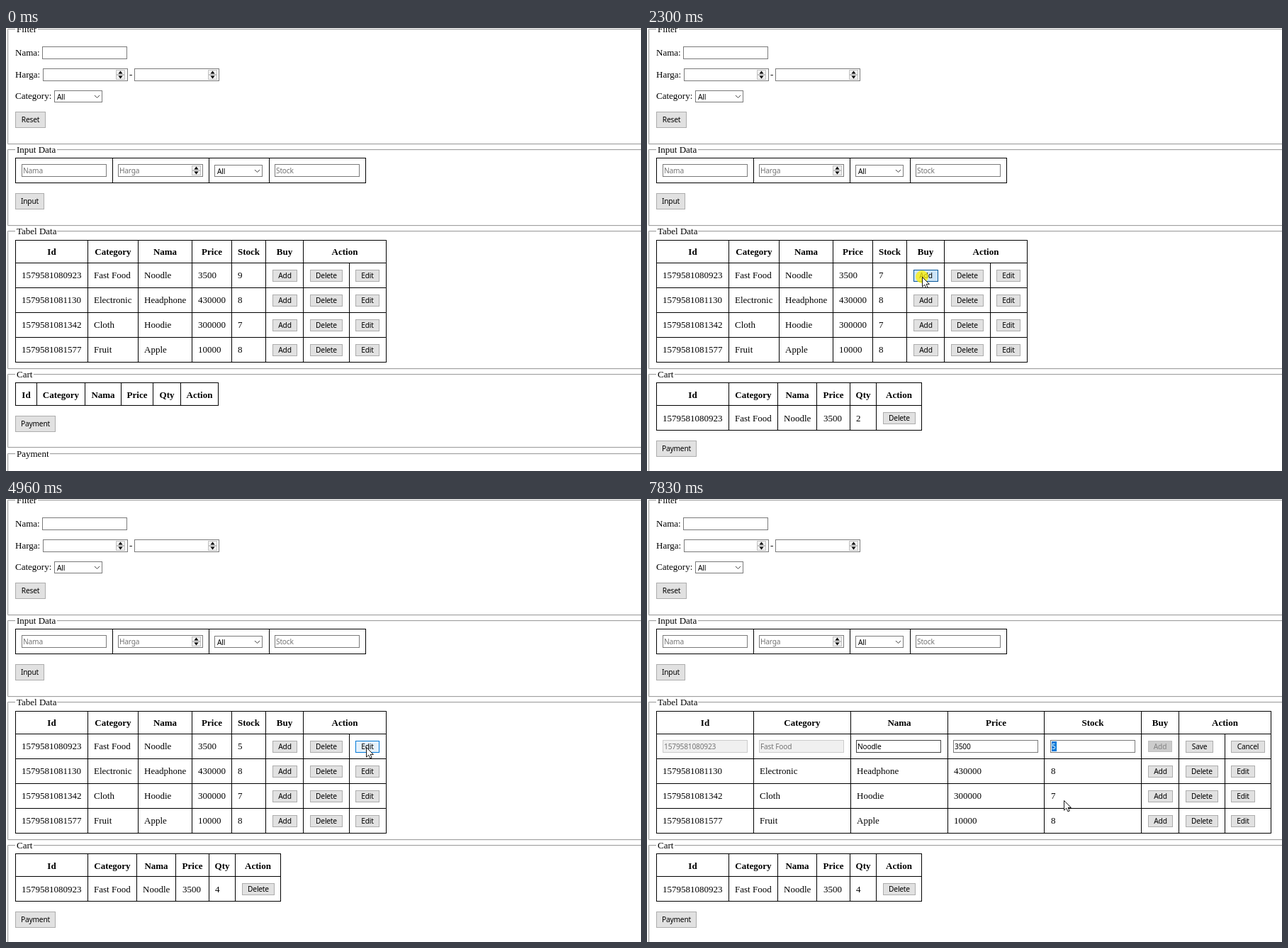
Write an HTML page that moves like this. It is 896 by 625 pixels and loops after 8000 ms.

```html
<!DOCTYPE html>
<html lang="en">
<head>
<meta charset="utf-8">
<title>Shop table</title>
<style>
html, body { margin: 0; width: 100%; height: 100%; overflow: hidden; background: #fff; }
svg { display: block; width: 896px; height: 625px; }
text { font: 13px "Liberation Serif", "Times New Roman", serif; fill: #000; white-space: pre; }
.head { font-weight: bold; }
.ui { font: 10.2px "Noto Sans", Tahoma, sans-serif; letter-spacing: -.2px; }
.mid { text-anchor: middle; }
.hint { fill: #757575; }
.field { fill: #fff; stroke: #7a7a7a; }
.field.dark { stroke: #444; }
.field.hover { stroke: #111; }
.field.focus { stroke: #0078d7; }
.field.off { fill: #f0f0f0; stroke: #ccc; }
.btn { fill: #e1e1e1; stroke: #adadad; }
.btn.hover { fill: #e5f1fb; stroke: #0078d7; }
.btn.press { fill: #cce4f7; stroke: #005499; }
.btn.off { fill: #ccc; stroke: #bfbfbf; }
.line { fill: none; stroke: #000; }
</style>
</head>
<body>
<svg id="stage" viewBox="0 0 896 625"></svg>
<script>
const stage = document.getElementById('stage');

const rect = (x, y, w, h, attrs) => `<rect x="${x}" y="${y}" width="${w}" height="${h}" ${attrs}/>`;
const frame = (x, y, w, h, cls, id = '') =>
  rect(x + .5, y + .5, w - 1, h - 1, `class="${cls}" id="${id}"`);
const text = (x, y, s, cls = '', id = '') => `<text x="${x}" y="${y}" class="${cls}" id="${id}">${s}</text>`;
const group = (id, ...parts) => `<g id="${id}">${parts.join('')}</g>`;

const field = (x, y, s = '', cls = '', textCls = '', id = '') =>
  frame(x, y, 120, 18, 'field ' + cls, id) + text(x + 2, y + 13, s, 'ui ' + textCls, id && id + 'Text');
const button = (x, y, w, s, id = '', h = 17) =>
  frame(x, y, w, h, 'btn', id) + text(x + w / 2, y + (h + 7) / 2, s, 'ui mid');
const bigButton = (y, w, s) => button(13, y, w, s, '', 23);

function spinner(x, y) {
  const half = (dy, tri) => rect(x + .5, y + dy + .5, 12, 6, 'fill="#f0f0f0" stroke="#c4c4c4"') +
    `<path d="M${x + 6.5} ${y + dy + 3.5}${tri}z"/>`;
  return half(0, 'm0-2l3 4h-6') + half(7, 'm0 2l3-4h-6');
}

const select = (x, y) => frame(x, y, 68, 17, 'field') + text(x + 4, y + 12.5, 'All', 'ui') +
  `<path d="M${x + 57} ${y + 7}l3.5 3.5 3.5-3.5" fill="none" stroke="#444"/>`;

function fieldset(top, bottom, label, w) {
  const path = (d, color) => `<path d="${d}" fill="none" stroke="${color}"/>`;
  return path(`M897 ${top + 1.5}H3.5V${bottom - .5}`, '#f0f0f0') +
    path(`M2 ${bottom + 1.5}H897`, '#f0f0f0') +
    path(`M897 ${top + .5}H2.5V${bottom + .5}H897`, '#a0a0a0') +
    rect(13, top - 1, w, 4, 'fill="#fff"') + text(15, top + 5, label);
}

// Vertical lines at xs, horizontal at ys; the split column skips the header.
function grid(xs, ys, split) {
  const l = xs[0], r = xs[xs.length - 1], b = ys[ys.length - 1];
  let d = ys.map(y => `M${l} ${y + .5}H${r + 1}`).join('');
  d += xs.map(x => `M${x + .5} ${ys[0]}V${b}`).join('');
  if (split) d += `M${split + .5} ${ys[1]}V${b}`;
  return `<path class="line" d="${d}"/>`;
}

const heads = (xs, y, names) => names.split(' ')
  .map((s, i) => text((xs[i] + xs[i + 1] + 1) / 2, y, s, 'head mid')).join('');

const goods = [
  ['1579581080923', 'Fast Food', 'Noodle', '3500', '9'],
  ['1579581081130', 'Electronic', 'Headphone', '430000', '8'],
  ['1579581081342', 'Cloth', 'Hoodie', '300000', '7'],
  ['1579581081577', 'Fruit', 'Apple', '10000', '8']
];
const rowYs = [299, 331, 366, 401, 436, 471];
const dataHeads = 'Id Category Nama Price Stock Buy Action';

function dataRow(row, i, xs, btnXs) {
  const y = 353 + i * 35, id = s => i ? '' : s;
  return row.map((s, c) => text(xs[c], y, s, '', c === 4 ? id('stock') : '')).join('') +
    button(btnXs[0], y - 12, 35, 'Add', id('add')) +
    button(btnXs[1], y - 12, 46, 'Delete', id('del')) +
    button(btnXs[2], y - 12, 34, 'Edit', id('edit'));
}

function viewTable() {
  const xs = [13, 115, 186, 262, 318, 366, 419, 536];
  return grid(xs, rowYs, 484) + heads(xs, 320, dataHeads) +
    goods.map((r, i) => dataRow(r, i, [22, 124, 195, 271, 327], [376, 429, 493])).join('');
}

function editTable() {
  const xs = [13, 150, 287, 424, 560, 697, 750, 880];
  const [id, cat, name, price] = goods[0];
  return grid(xs, rowYs, 815) + heads(xs, 320, dataHeads) +
    field(22, 340, id, 'off', 'hint') + field(158, 340, cat, 'off', 'hint') +
    field(295, 340, name, 'dark') + field(432, 340, price, '', '', 'price') +
    field(569, 340, '', '', '', 'qtyBox') +
    rect(571, 342, 7, 14, 'id="mark" fill="#0078d7"') + text(571, 353, '5', 'ui', 'five') +
    rect(577, 343, 1, 13, 'id="caret"') +
    frame(707, 341, 34, 16, 'btn off') + `<text x="724" y="353" class="ui mid" style="fill:#838383">Add</text>` +
    button(760, 341, 39, 'Save') + button(824, 341, 48, 'Cancel') +
    goods.slice(1).map((r, i) => dataRow(r, i + 1, [22, 159, 296, 433, 570], [707, 760, 824])).join('');
}

function emptyCart() {
  const xs = [13, 43, 111, 162, 207, 246, 299];
  return fieldset(488, 591, 'Cart', 26) + grid(xs, [500, 532]) +
    heads(xs, 522, 'Id Category Nama Price Qty Action') +
    bigButton(547, 57, 'Payment') + fieldset(600, 700, 'Payment', 49);
}

function fullCart() {
  const xs = [13, 115, 184, 239, 286, 323, 387], cellXs = [22, 124, 193, 249];
  return fieldset(488, 626, 'Cart', 26) + grid(xs, [500, 532, 567]) +
    heads(xs, 522, 'Id Category Nama Price Qty Action') +
    cellXs.map((x, i) => text(x, 555, goods[0][i])).join('') + text(295, 555, '1', '', 'qty') +
    button(333, 542, 46, 'Delete') + bigButton(582, 57, 'Payment');
}

stage.innerHTML = [
  fieldset(1, 163, 'Filter', 32),
  text(13, 39, 'Nama:'), field(51, 26),
  text(13, 70, 'Harga:'), field(52, 57), spinner(155, 59),
  text(174, 70, '-'), field(181, 57), spinner(285, 59),
  text(13, 100, 'Category:'), select(68, 88), bigButton(118, 43, 'Reset'),
  fieldset(171, 278, 'Input Data', 59),
  grid([13, 150, 286, 371, 507], [183, 218]),
  field(22, 192, 'Nama', '', 'hint'), field(158, 192, 'Harga', '', 'hint'), spinner(262, 194),
  select(294, 193), field(379, 192, 'Stock', '', 'hint'), bigButton(233, 41, 'Input'),
  fieldset(286, 480, 'Tabel Data', 59),
  group('view', viewTable()), group('form', editTable()),
  group('empty', emptyCart()), group('full', fullCart()),
  group('pointer',
    '<circle id="glow" r="9" fill="#fff000" fill-opacity=".75"/>',
    '<path id="arrow" d="M.5.5V14.2L3.7 11.2 6 16 8.2 15 6.1 10.4H10.4Z" fill="#fff" stroke="#000" stroke-width=".9"/>',
    '<path id="beam" d="M-2.5-4.5H-.5M.5-4.5H2.5M0-4V6M-2.5 6.5H-.5M.5 6.5H2.5" fill="none" stroke="#000"/>')
].join('');

const $ = id => document.getElementById(id);
const show = (id, on) => { $(id).style.display = on ? '' : 'none'; };

// Pointer moves: start, end, number of steps, way points.
const moves = [
  [70, 830, 11, [[767, 614], [470, 430], [376, 360]]],
  [1000, 1150, 3, [[382, 356], [388, 351]]],
  [3860, 4650, 11, [[394, 352], [475, 355], [508, 350]]],
  [5890, 6600, 10, [[516, 353], [557, 376], [596, 350]]],
  [6990, 7220, 4, [[588, 350], [552, 347]]],
  [7450, 7680, 4, [[557, 366], [578, 408], [587, 424]]],
  [7830, 7831, 2, [[588, 425], [588, 425]]]
];
const clicks = [[1380, 1540], [1770, 1920], [2230, 2380], [2850, 3010], [4810, 4960], [6910, 7450]];
const sales = [1460, 1920, 2310, 2930];
const targets = [
  ['add', 376, 35], ['del', 429, 47], ['edit', 493, 34]
];
const inputs = [['price', 432, 120], ['qtyBox', 569, 120]];

function pointerAt(t) {
  const [t0, t1, n, pts] = moves.filter(m => m[0] <= t).pop() || moves[0];
  const step = Math.min(n - 1, Math.floor((t - t0) * (n - 1) / (t1 - t0) + .02));
  const u = Math.max(0, step) / (n - 1) * (pts.length - 1);
  const i = Math.min(pts.length - 2, Math.floor(u)), f = u - i;
  return [0, 1].map(k => Math.round(pts[i][k] + (pts[i + 1][k] - pts[i][k]) * f));
}

function draw(t) {
  const [x, y] = pointerAt(t);
  const down = clicks.some(([a, b]) => t >= a && t < b);
  const sold = sales.filter(s => t >= s).length;
  const editing = t >= 5110, focused = t >= 6910 && t < 7450, marked = t >= 7070;
  const over = ([, left, w]) => t >= 70 && x >= left && x < left + w && y >= 340 && y < 358;

  show('view', !editing);
  show('form', editing);
  show('empty', !sold);
  show('full', sold);
  $('stock').textContent = 9 - sold;
  $('qty').textContent = sold;

  for (const b of targets)
    $(b[0]).setAttribute('class', 'btn' + (over(b) ? down ? ' press' : ' hover' : ''));
  for (const b of inputs)
    $(b[0]).setAttribute('class', 'field' +
      (focused && b[0] === 'qtyBox' ? ' focus' : over(b) && !focused ? ' hover' : ''));
  show('mark', marked);
  show('caret', focused && !marked);
  $('five').style.fill = marked ? '#fff' : '#000';

  const beam = editing && (focused || inputs.some(over));
  show('pointer', t >= 70);
  show('glow', down);
  show('arrow', !beam);
  show('beam', beam);
  $('pointer').setAttribute('transform', `translate(${x} ${y})`);
}

const start = performance.now();
function tick() {
  draw((performance.now() - start) % 8000);
  requestAnimationFrame(tick);
}
tick();
</script>
</body>
</html>
```
